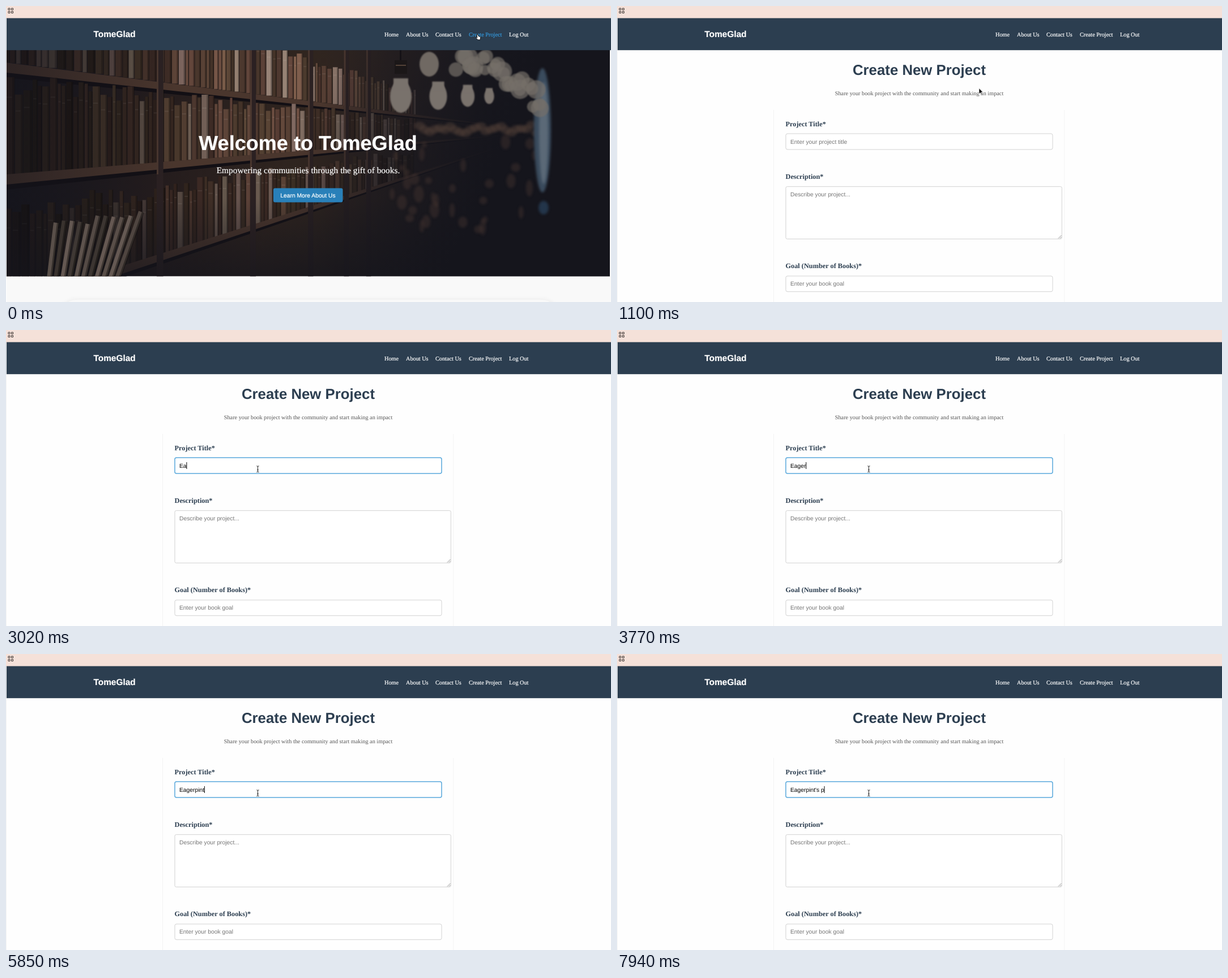
An HTML page with a canvas that plays this animation: 1068x524 px, repeating every 8000 ms.

```html
<!DOCTYPE html>
<html lang="en">
<head>
<meta charset="utf-8">
<title>Create New Project</title>
<style>
html, body { margin: 0; width: 100%; height: 100%; overflow: hidden; background: #fefefe; }
canvas, svg { position: absolute; left: 0; top: 0; }
text { text-rendering: geometricPrecision; white-space: pre; }
.sans { font: 10.3px "Liberation Sans", Arial, sans-serif; }
.serif { font: 10.25px "Liberation Serif", "Times New Roman", serif; }
.bold { font-weight: bold; }
.mid { text-anchor: middle; }
.label { font-size: 12.3px; font-weight: bold; fill: #2c3e50; }
.hint { fill: #757575; }
.light { fill: #fff; stroke: #fff; stroke-width: .2; }
.light .active { fill: #3498db; stroke: #3498db; }
.box { fill: #fff; stroke: #d2d2d2; }
.box.focus { stroke: #58a8dc; stroke-width: 1.5; }
</style>
</head>
<body>
<canvas id="photo" width="1068" height="524"></canvas>
<svg width="1068" height="524">
  <g id="home">
    <text class="sans bold mid light" x="533" y="255" style="font-size:36.1px">Welcome to TomeGlad</text>
    <text class="serif mid light" x="533.5" y="296" style="font-size:15.4px">Empowering communities through the gift of books.</text>
    <rect x="472" y="322.5" width="122.5" height="25" rx="3" fill="#2980b9"/>
    <text class="sans mid light" x="533" y="338.7">Learn More About Us</text>
  </g>

  <g id="form">
    <rect x="1" y="78" width="1067" height="446" fill="#fefefe"/>
    <path d="M.5 78V524M276.5 184V524M790 184V524" stroke="#f3f3f3"/>
    <text class="sans bold mid" x="533.5" y="122" fill="#2c3e50" style="font-size:25.8px">Create New Project</text>
    <text class="serif mid" x="533.5" y="157.7" fill="#555">Share your book project with the community and start making an impact</text>
    <text class="serif label" x="297.5" y="212.5">Project Title*</text>
    <text class="serif label" x="297.5" y="305.7">Description*</text>
    <text class="serif label" x="297.5" y="464.3">Goal (Number of Books)*</text>
    <rect id="titleBox" class="box" x="298" y="226" width="471" height="28" rx="3"/>
    <rect class="box" x="298" y="319.7" width="487.3" height="92.7" rx="2.5"/>
    <path d="M779 411.5l5.5-5.5M782 411.5l2.5-2.5" stroke="#777" stroke-width=".8"/>
    <rect class="box" x="298" y="478" width="471" height="27.7" rx="3"/>
    <text id="titleHint" class="sans hint" x="306" y="243.6">Enter your project title</text>
    <text class="sans hint" x="306" y="337">Describe your project...</text>
    <text class="sans hint" x="306" y="495.3">Enter your book goal</text>
    <text id="typed" class="sans" x="306" y="243.6"></text>
    <rect id="caret" y="234" width="1" height="12"/>
  </g>

  <rect width="1068" height="22" fill="#f5e1d9"/>
  <path d="M4 4h3v3h-3zM9.500 4h3v3h-3zM4 9.500h3v3h-3zM9.500 9.500h3v3h-3z" fill="none" stroke="#3a3330"/>
  <rect x="1" y="21.5" width="1067" height="56.7" fill="#2c3e50"/>
  <text class="sans bold light" x="154.500" y="55.400" style="font-size:15.4px">TomeGlad</text>
  <g class="serif light">
    <text x="668" y="53.5">Home</text>
    <text x="706" y="53.5">About Us</text>
    <text x="758" y="53.5">Contact Us</text>
    <text id="link" x="817" y="53.5">Create Project</text>
    <text x="888" y="53.5">Log Out</text>
  </g>

  <g id="cursor">
    <path id="hand" d="M-2.500-4.500q1-1 2 0l1 3 3 .8q1 .4 .8 1.600l-.7 4H-.5L-4 1.200q-.2-1.200 1.300-.6l1 .7z" fill="#fff" stroke="#000" stroke-width=".9"/>
    <path id="arrow" d="M0-5v10l2.400-2.200 1.600 3.500 1.500-.7-1.500-3.400h3.200z" stroke="#fff" stroke-width=".8"/>
    <path id="beam" d="M-2-5.500Q0-5.500 0-4Q0-5.500 2-5.500M0-4V4M-2 5.500Q0 5.500 0 4Q0 5.500 2 5.500M-1.300 1.500H1.300" fill="none" stroke="#222"/>
  </g>
</svg>
<script>
const $ = id => document.getElementById(id);
const show = (id, on) => $(id).style.display = on ? "" : "none";
const photo = $("photo");
const g = photo.getContext("2d");

let seed = 11;
const random = () => (seed = seed * 16807 % 2147483647) / 2147483647;
const between = (a, b) => a + (b - a) * random();

function rect(color, x, y, w, h) {
  g.fillStyle = color;
  g.fillRect(x, y, w, h);
}

function oval(color, x, y, rx, ry = rx) {
  g.fillStyle = color;
  g.beginPath();
  g.ellipse(x, y, rx, ry, 0, 0, 7);
  g.fill();
}

function fade(x0, y0, x1, y1, ...colors) {
  const fill = g.createLinearGradient(x0, y0, x1, y1);
  colors.forEach((c, i) => fill.addColorStop(i / (colors.length - 1), c));
  rect(fill, 1, 78, 1065, 400.5);
}

// Shelf lines converge on one vanishing point; y is the height at the left edge.
const vanish = { x: 956, y: 222 };
const depth = x => 1 - x / vanish.x;
const project = (x, y) => vanish.y + (y - vanish.y) * depth(x);
const post = i => 700 * (1 - .62 ** i);

function board(color, y, thick) {
  g.fillStyle = color;
  g.beginPath();
  g.moveTo(0, y);
  g.lineTo(vanish.x, vanish.y);
  g.lineTo(0, y + thick);
  g.fill();
}

function shelf(y, height, dim) {
  for (let x = 0; x < 720;) {
    const w = between(7, 17) * (.35 + .65 * depth(x));
    const top = project(x, y - height * between(.68, .88));
    const h = project(x, y) - top;
    const glow = 15 + 17 * Math.exp(-(((x - 470) / 240) ** 2));
    const pale = random() < .18;
    const light = glow * dim * (pale ? 1.5 : between(.6, 1.2));
    rect(`hsl(${between(14, 28)} ${pale ? 14 : 25}% ${light}%)`, x, top, w - 1, h);
    rect("#0004", x + w * .7, top, w * .3, h);
    rect("#fff1", x + 1, top + h * .2, w * .6, 2);
    x += w;
  }
}

function leaningBooks() {
  for (let i = 0; i < 11; i++) {
    g.save();
    g.translate(72 + i * 12, 482);
    g.rotate(.12 + i * .022);
    const light = between(18, 38);
    const height = between(90, 115) + i * 2;
    rect(`hsl(20 10% ${light}%)`, 0, -height, 9, height);
    rect("#0006", 6, -height, 4, height);
    g.restore();
  }
}

function distantLights() {
  g.filter = "blur(2px)";
  for (let i = 0; i < 24; i++)
    oval("#51403880", 730 + i * 9, 218 + between(-8, 8), 10, 7);
  for (let i = 0; i < 34; i++)
    oval("#4a383360", between(670, 940), between(240, 400), between(4, 9), between(5, 15));
  oval("#3a4b5d", 947, 220, 15, 110);
  oval("#5b6977", 949, 225, 8, 90);
  oval("#23354a", 949, 357, 9, 12);
  g.filter = "blur(1px)";
  for (let i = 0; i < 30; i++) {
    const u = i / 29;
    oval("#756f69b0", 800 + 145 * u + between(-8, 8), 82 + 75 * u * u + between(0, 32), between(9, 18));
  }
  oval("#706963", 747, 103, 17, 22);
}

function hangingBulbs() {
  for (let i = 3; i >= 0; i--) {
    const x = 697 + 73 * i - 7 * i * i, s = 1 - .18 * i;
    oval("#79726c", x, 160, 19 * s, 29 * s);
    rect("#79726c", x - 13 * s, 160 - 32 * s, 26 * s, 20 * s);
  }
  g.filter = "none";
  rect("#151216", 695, 78, 3, 18);
  rect("#1b1718", 686, 96, 22, 24);
  rect("#534237", 688, 104, 18, 2);
}

function drawPhoto() {
  rect("#f9f9f9", 1, 478, 1067, 46);
  g.save();
  g.shadowColor = "#0001";
  g.shadowBlur = 10;
  g.beginPath();
  g.roundRect(95, 520, 880, 60, 30);
  g.fill();
  g.restore();

  g.save();
  g.beginPath();
  g.rect(1, 78, 1065, 400.5);
  g.clip();
  fade(0, 0, 1066, 0, "#17161d", "#241c1d", "#30251f", "#2a2223", "#17171f");
  [100, 298, 525].forEach((y, tier) => {
    shelf(y, 205, 1.1 - tier * .17);
    board("#120f14", y + 17, 10);
    board("#4a362d", y, 18);
  });
  for (let i = 1; i < 6; i++) {
    const w = 14 * (.4 + .6 * depth(post(i)));
    rect("#2b2122", post(i), 78, w, 401);
    rect("#4a372f", post(i), 78, 3, 220);
  }
  fade(0, 340, 0, 479, "#15151c00", "#15151caa");
  fade(0, 0, 300, 0, "#14141c88", "#14141c00");
  leaningBooks();
  fade(560, 0, 980, 0, "#17171f00", "#17171f55", "#17171f");
  fade(500, 300, 800, 430, "#15151c00", "#15151c");
  distantLights();
  hangingBulbs();
  g.restore();
}

const title = "Eagerpint's p";
const keyTimes = [2580, 3020, 3320, 3620, 3770, 5110, 5400, 5550, 5850, 6440, 6890, 7190, 7940];

function drawCursor(t) {
  const step = t < 780 ? 0 : Math.min(6, 1 + Math.floor((t - 780) / 150));
  const p = step / 6, ease = p * p * (3 - 2 * p);
  $("cursor").setAttribute("transform", `translate(${833.5 - 389 * ease} ${55 + 191.2 * ease})`);
  show("hand", step === 0);
  show("arrow", step > 0 && step < 6);
  show("beam", step === 6);
  $("link").classList.toggle("active", step === 0);
}

function drawTitle(t) {
  const count = keyTimes.filter(k => k <= t).length;
  const focused = t >= 1830;
  const lastKey = count ? keyTimes[count - 1] : 1980;
  $("typed").textContent = title.slice(0, count);
  show("titleHint", !count);
  $("titleBox").classList.toggle("focus", focused);
  show("caret", focused && (t - lastKey) % 890 < 450);
  $("caret").setAttribute("x", 305.8 + (count ? $("typed").getComputedTextLength() : 0));
}

function frame() {
  const t = performance.now() % 8000;
  const home = t < 330;
  photo.style.display = home ? "" : "none";
  show("home", home);
  show("form", !home);
  drawCursor(t);
  if (!home) drawTitle(t);
  requestAnimationFrame(frame);
}

drawPhoto();
frame();
</script>
</body>
</html>
```
